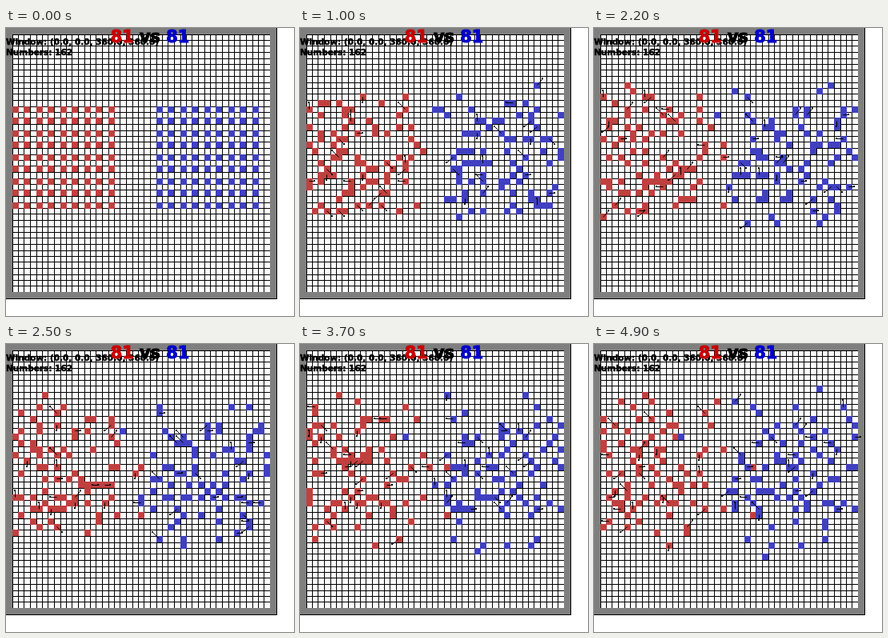
An HTML page with a canvas that plays this animation: 360 px wide and 360 px high, repeating every 5000 ms.

```html
<!DOCTYPE html>
<html lang="en">
<head>
<meta charset="utf-8">
<title>Grid battle</title>
<style>
  html, body { margin: 0; width: 100%; height: 100%; overflow: hidden; background: #fff; }
  canvas, svg { position: absolute; left: 0; top: 0; width: 360px; height: 360px; }
  text { font: bold 10.5px "DejaVu Sans", Verdana, sans-serif; stroke: #000; stroke-width: .5px; white-space: pre; }
  .banner { font-size: 20.8px; text-anchor: middle; }
  .banner tspan { stroke-width: 1.1px; }
  .red { fill: #c80000; stroke: #c80000; }
  .blue { fill: #0000c8; stroke: #0000c8; }
</style>
</head>
<body>
<canvas id="board" width="360" height="360"></canvas>
<svg viewBox="0 0 360 360">
  <text x="0" y="21">Window: (0.0, 0.0, 360.0, 360.0)</text>
  <text x="0" y="34">Numbers: 162</text>
  <text class="banner" x="180" y="18"><tspan class="red">81</tspan><tspan> vs </tspan><tspan class="blue">81</tspan></text>
</svg>
<script>
const ctx = document.getElementById('board').getContext('2d');
const CELL = 7.5, SIZE = 45, LOOP = 5000, TURNS = 18;
const FIRST = 100, HOLD = 300;
const RED = '#c04040', BLUE = '#4040c0';

// Pixel of a grid line, halves rounded to even
function edge(n) {
  const v = n * CELL, r = Math.round(v);
  return r - v === .5 && r % 2 ? r - 1 : r;
}

// A few agents that leave their group: from cell, to cell
const STRAYS = [
  { from: [17, 29], to: [26, 28] },
  { from: [17, 19], to: [26, 20] },
  { from: [25, 13], to: [14, 15] },
  { from: [31, 29], to: [28, 35] },
  { from: [37, 13], to: [37, 7] }
];

let seed = 20817;
function rand() {
  seed = (seed + 0x6D2B79F5) | 0;
  let r = Math.imul(seed ^ (seed >>> 15), 1 | seed);
  r = (r + Math.imul(r ^ (r >>> 7), 61 | r)) ^ r;
  return ((r ^ (r >>> 14)) >>> 0) / 4294967296;
}
const pick = list => list[Math.floor(rand() * list.length)];

const MOVES = [], HITS = [];
for (let dx = -2; dx <= 2; dx++) for (let dy = -2; dy <= 2; dy++) {
  if (dx * dx + dy * dy <= 4) MOVES.push([dx, dy]);
  if ((dx || dy) && Math.abs(dx) < 2 && Math.abs(dy) < 2) HITS.push([dx, dy]);
}

function makeAgents() {
  const list = [];
  for (const left of [1, 25])
    for (let i = 0; i < 9; i++)
      for (let j = 0; j < 9; j++) {
        const x = left + 2 * i, y = 13 + 2 * j;
        const path = STRAYS.find(s => s.from[0] === x && s.from[1] === y);
        list.push({ x, y, path, hit: null, red: left === 1 });
      }
  return list;
}

const id = (x, y) => y * SIZE + x;
function allowed(a, x, y) {
  const lo = a.red ? 1 : 22, hi = a.red ? 21 : 43;
  return x >= lo && x <= hi && y >= 8 && y <= 33;
}

// Each turn an agent strikes a neighbour cell or moves up to two cells
function step(agents, turn) {
  const taken = new Set(agents.map(a => id(a.x, a.y)));
  return agents.map(a => {
    let { x, y } = a, hit = null;
    if (a.path) {
      const { from, to } = a.path, u = turn / (TURNS - 1);
      [x, y] = from.map((v, i) => Math.round(v + (to[i] - v) * u));
    } else if (rand() < 8 / 21) {
      if (rand() < .75) hit = pick(HITS);
    } else {
      const [dx, dy] = pick(MOVES);
      if (allowed(a, x + dx, y + dy) && !taken.has(id(x + dx, y + dy))) { x += dx; y += dy; }
    }
    taken.delete(id(a.x, a.y));
    taken.add(id(x, y));
    return { ...a, x, y, hit };
  });
}

const turns = [makeAgents()];
for (let n = 1; n < TURNS; n++) turns.push(step(turns[n - 1], n));

function drawBoard() {
  const end = edge(SIZE), inner = edge(SIZE - 1);
  ctx.fillStyle = '#fff';
  ctx.fillRect(0, 0, 360, 360);
  ctx.fillStyle = '#000';
  for (let i = 0; i <= SIZE; i++) {
    ctx.fillRect(edge(i), 0, 1, end + 1);
    ctx.fillRect(0, edge(i), end + 1, 1);
  }
  ctx.fillStyle = '#7f7f7f';
  ctx.fillRect(0, 0, end, 8);
  ctx.fillRect(0, 0, 8, end);
  ctx.fillRect(inner, 0, 8, end);
  ctx.fillRect(0, inner, end, 8);
}

function drawAgents(agents) {
  for (const a of agents) {
    ctx.fillStyle = a.red ? RED : BLUE;
    ctx.fillRect(edge(a.x), edge(a.y), 8, 8);
  }
  ctx.fillStyle = ctx.strokeStyle = '#000';
  ctx.lineWidth = 1;
  for (const a of agents) {
    if (!a.hit) continue;
    const [x, y] = [a.x, a.y].map(v => Math.floor((v + .5) * CELL));
    const tx = Math.floor(x + a.hit[0] * CELL), ty = Math.floor(y + a.hit[1] * CELL);
    ctx.beginPath();
    ctx.moveTo(x + .5, y + .5);
    ctx.lineTo(tx + .5, ty + .5);
    ctx.stroke();
    ctx.fillRect(tx - 1, ty - 1, 2, 2);
  }
}

let shown = -1;
const start = performance.now();
function frame(now) {
  const t = Math.max(0, now - start) % LOOP;
  const n = Math.max(0, Math.min(TURNS - 1, 1 + Math.floor((t - FIRST) / HOLD)));
  if (n !== shown) {
    drawBoard();
    drawAgents(turns[n]);
    shown = n;
  }
  requestAnimationFrame(frame);
}
frame(start);
</script>
</body>
</html>
```
